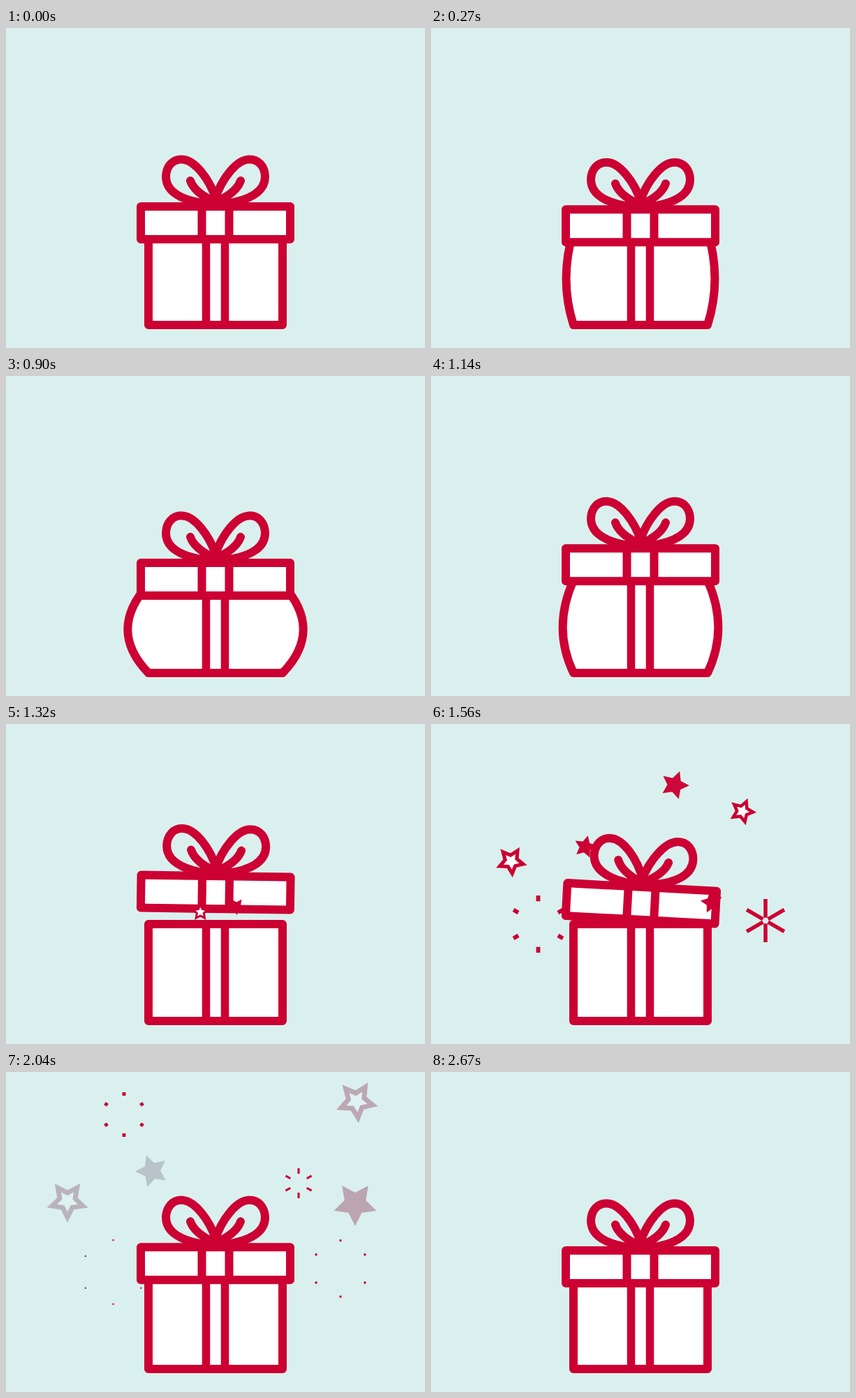
These frames come from a looping animation (600x459 px, 2730 ms). An HTML page:

```html
<!DOCTYPE html>
<html lang="en">
<head>
<meta charset="utf-8">
<title>Gift box</title>
<style>
  html, body { margin: 0; width: 100%; height: 100%; overflow: hidden; background: #daf0ee; }
  svg { display: block; width: 100%; height: 100%; }
</style>
</head>
<body>
<svg viewBox="0 0 600 459">
  <g fill="none" stroke="#cc0033" stroke-width="12" stroke-linejoin="round" stroke-linecap="round">
    <path id="body" fill="#fff"/>
    <path id="bands" stroke-linecap="butt" stroke-width="11.5"/>
    <g id="bursts" stroke-linecap="butt"></g>
    <g id="lid">
      <path id="loop" d="M301 246C291 216 270 189 252 188.5C238 188 229.5 199 229 213C229 232 246 246 285 252M264 219C268 231 281 241 298 249"/>
      <use href="#loop" transform="matrix(-1 0 0 1 600 0)"/>
      <path fill="#fff" d="M193 256H407V303H193Z"/>
      <path stroke-linecap="butt" d="M280.5 256V303M319.5 256V303"/>
    </g>
  </g>
  <g id="stars"></g>
</svg>
<script>
const LOOP = 2730, STEP = 30, SQUASH = 1080, APEX = 1300, REST = 2670;
const RED = [204, 0, 51], GREY = [184, 200, 204], WHITE = [255, 255, 255], SKY = [218, 240, 238];
const $ = id => document.getElementById(id);
const clamp = v => Math.max(0, Math.min(1, v));
const span = (t, a, b) => clamp((t - a) / (b - a));
const mix = (a, b, k) => a + (b - a) * k;
const blend = (a, b, k) => `rgb(${a.map((v, i) => Math.round(mix(v, b[i], k)))})`;
const add = (parent, tag) =>
  parent.appendChild(document.createElementNS("http://www.w3.org/2000/svg", tag));
const set = (el, attrs) => {
  for (const key in attrs) el.setAttribute(key, attrs[key]);
};

// from, to: positions; turn: angles at launch and at rest; fade: start of fading
const stars = [
  { start: 1310, from: [329, 274], to: [352, 59], r: 27.6, turn: [36, 17.6], fade: 1515 },
  { start: 1374, from: [255, 275], to: [209, 142], r: 24, turn: [109, -20], fade: 1645 },
  { start: 1310, from: [290, 275], to: [88, 185], r: 31, turn: [-2, 36], fade: 1668, hollow: true },
  { start: 1412, from: [345, 275], to: [502, 42], r: 31.5, turn: [6, 31], fade: 1684, hollow: true },
  { start: 1519, from: [374, 275], to: [500, 189], r: 32, turn: [-23, 36], fade: 1690 }
];
const bursts = [
  { start: 1320, x: 153.5, y: 287, r: 47, w: 6 },
  { start: 1402, x: 479, y: 282, r: 42, w: 5.5 },
  { start: 1640, x: 169, y: 61, r: 33, w: 5.5 },
  { start: 1835, x: 419, y: 159.5, r: 26, w: 3.2 }
];

function starPath(radius) {
  let d = "";
  for (let i = 0; i < 10; i++) {
    const a = i * Math.PI / 5, q = radius * (i % 2 ? 0.5 : 1);
    d += `${i ? "L" : "M"}${q * Math.sin(a)} ${-q * Math.cos(a)}`;
  }
  return d + "Z";
}

for (const s of stars) {
  s.el = add($("stars"), "path");
  set(s.el, { d: starPath(s.hollow ? 0.75 : 1), "stroke-width": s.hollow ? 0.22 : 0 });
}
for (const b of bursts) {
  b.el = add($("bursts"), "path");
  set(b.el, { transform: `translate(${b.x} ${b.y})` });
}

function drawBody(bulge) {
  const top = 287 + bulge * 0.4, mid = (top + 426) / 2 + 2, push = bulge * 2;
  set($("body"), {
    d: `M204 426Q${204 - push} ${mid} 204 ${top}H396Q${396 + push} ${mid} 396 426Z`
  });
  set($("bands"), { d: `M286.5 ${top}V426M313.5 ${top}V426` });
}

function drawLid(t, bulge) {
  let dy = bulge * 0.4;
  if (t > SQUASH) dy = mix(13.2, -39.5, Math.sin(span(t, SQUASH, APEX) * Math.PI / 2));
  if (t > APEX) dy = -39.5 * Math.pow(1 - span(t, APEX, REST), 2.75);
  const tilt = 3.1 * Math.sin(Math.PI * span(t, 1270, 1870));
  set($("lid"), { transform: `translate(${tilt * 0.3} ${dy}) rotate(${tilt} 300 279.5)` });
}

function drawStar(s, t) {
  const p = span(t, s.start, s.start + 510), u = 1 - Math.pow(1 - p, 3);
  const q = Math.pow(span(t, s.fade, s.fade + 400), 1.5);
  const size = s.r * (0.42 + 0.58 * Math.pow(p, 0.75));
  const x = mix(s.from[0], s.to[0], u), y = mix(s.from[1], s.to[1], u);
  const ink = blend(RED, GREY, q);
  set(s.el, {
    transform: `translate(${x} ${y}) rotate(${mix(...s.turn, u)}) scale(${size})`,
    fill: s.hollow ? blend(WHITE, SKY, q) : ink,
    stroke: s.hollow ? ink : "none",
    opacity: p > 0 ? 1 - span(t, s.fade + 400, s.fade + 520) : 0
  });
}

function drawBurst(b, t) {
  const age = t - b.start;
  const w = b.w * (1 - Math.pow(clamp(age / 830), 3));
  if (age <= 0 || w < 0.1) return set(b.el, { d: "" });
  const outer = b.r * (1 - Math.exp(-0.0085 * age));
  const lag = b.r * (1 - Math.exp(-0.0133 * Math.max(0, age - 150)));
  const inner = Math.max(0, Math.min(lag, outer - w));
  let d = "";
  for (let i = 0; i < 6; i++) {
    const c = Math.sin(i * Math.PI / 3), s = -Math.cos(i * Math.PI / 3);
    d += `M${c * inner} ${s * inner}L${c * outer} ${s * outer}`;
  }
  set(b.el, { d, "stroke-width": w });
}

function draw(t) {
  const press = 33 * (1 - Math.pow(1 - span(t, 0, 1100), 1.35));
  const bulge = t <= SQUASH ? press : 33 * Math.pow(1 - span(t, SQUASH, 1230), 1.5);
  drawBody(bulge);
  drawLid(t, bulge);
  for (const s of stars) drawStar(s, t);
  for (const b of bursts) drawBurst(b, t);
}

const began = performance.now();
function tick() {
  const t = (performance.now() - began) % LOOP;
  draw(Math.min(REST, Math.floor(t / STEP) * STEP));
  requestAnimationFrame(tick);
}
tick();
</script>
</body>
</html>
```
